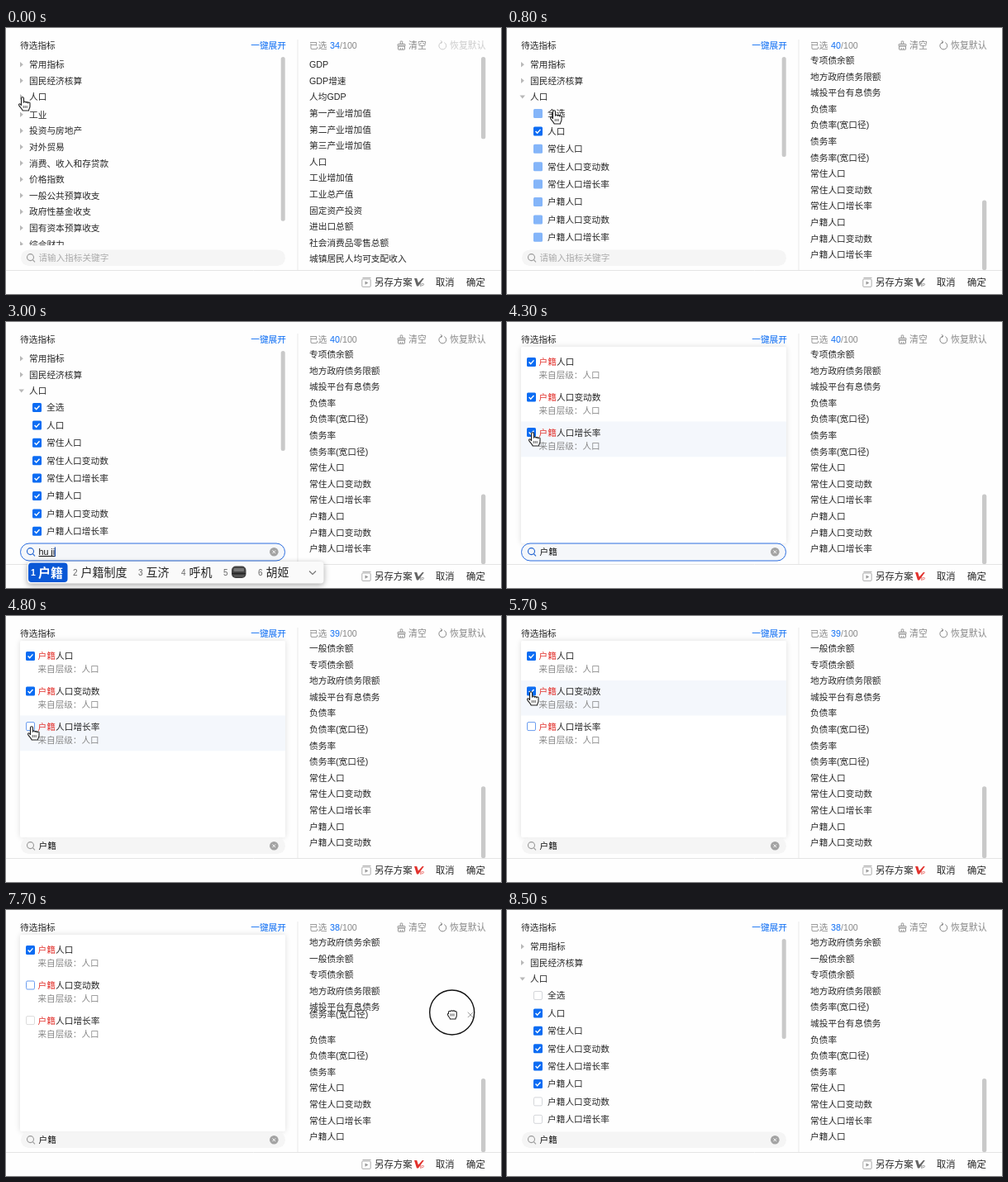
Animation of 599 by 322 pixels, one loop 8600 ms. Source, as an HTML page with a canvas:

```html
<!DOCTYPE html>
<html lang="zh-CN">
<head>
<meta charset="utf-8">
<title>指标选择</title>
<style>
html, body { margin: 0; width: 100%; height: 100%; overflow: hidden; background: #fff; }
canvas { display: block; width: 599px; height: 322px; }
</style>
</head>
<body>
<canvas id="stage"></canvas>
<script>
const W = 599, H = 322, LOOP = 8600, ROW = 19.6, SUB = 21.4;
const FONT = '"Liberation Sans", "Noto Sans CJK SC", "Noto Sans CJK", sans-serif';
const BLUE = '#0b6cf3', INK = '#262626', GREY = '#888', RED = '#e2322d';

// Moments at which the state changes, in ms
const T = { all: 720, focus: 1900, type: 2400, pick: 3300, results: 3500,
  off3: 4600, off2: 5900, grab: 6900, drop: 7900, close: 8200 };

const groups = ['常用指标', '国民经济核算', '人口', '工业', '投资与房地产', '对外贸易',
  '消费、收入和存贷款', '价格指数', '一般公共预算收支', '政府性基金收支', '国有资本预算收支', '综合财力', '地方债务'];
const children = ['全选', '人口', '常住人口', '常住人口变动数', '常住人口增长率',
  '户籍人口', '户籍人口变动数', '户籍人口增长率'];
const basics = ['GDP', 'GDP增速', '人均GDP', '第一产业增加值', '第二产业增加值', '第三产业增加值',
  '人口', '工业增加值', '工业总产值', '固定资产投资', '进出口总额', '社会消费品零售总额',
  '城镇居民人均可支配收入', '农村居民人均可支配收入', '存款余额', '贷款余额', '一般公共预算收入',
  '税收收入', '一般公共预算支出', '财政自给率', '政府性基金收入', '政府性基金支出',
  '国有资本预算收入', '国有资本预算支出', '综合财力', '地方政府债务余额', '一般债余额',
  '专项债余额', '地方政府债务限额', '城投平台有息债务', '负债率', '负债率(宽口径)', '债务率', '债务率(宽口径)'];
const DRAGGED = 33, DROP_AT = 29;

// Pointer path: time, x, y
const path = [[0, 20, 84], [200, 20, 84], [600, 57, 100], [950, 57, 100], [1600, 110, 278],
  [3750, 110, 278], [4200, 31, 134], [5000, 31, 134], [5500, 29, 92], [6050, 29, 92],
  [6700, 540, 195.5], [7000, 540, 195.5], [7700, 540, 126], [7900, 540, 117.5],
  [8000, 540, 117.5], [8300, 625, 100], [LOOP, 625, 100]];

const HAND = new Path2D('M-1.5 1.2a1.5 1.5 0 0 1 3 0V6.2a1.3 1.3 0 0 1 2.6.2a1.3 1.3 0 0 1 2.5.5' +
  'a1.2 1.2 0 0 1 2.4.6V11c0 2-1.5 3-1.5 5H.2C-.3 14-3 12-4.4 9.4C-5 8-3.4 7.2-2.5 8.4L-1.5 9.6Z');
const FIST = new Path2D('M-4.5-2a1.6 1.6 0 0 1 2.6-1.4a1.6 1.6 0 0 1 2.6-.3a1.6 1.6 0 0 1 2.6.5' +
  'a1.4 1.4 0 0 1 2 1.5V2c0 2-1.3 2.5-1.3 4H-2.5C-3 4-5.5 2.5-5.5.5C-5.5-.5-4.9-1-4.5-.6Z');

const canvas = document.getElementById('stage');
const dpr = window.devicePixelRatio || 1;
canvas.width = W * dpr;
canvas.height = H * dpr;
const c = canvas.getContext('2d');

const clamp = v => Math.max(0, Math.min(1, v));
const ramp = (t, a, b) => clamp((t - a) / (b - a));
const smooth = k => k * k * (3 - 2 * k);

function text(s, x, y, color = INK, size = 10.7, align = 'left', weight = 400) {
  c.font = `${weight} ${size}px ${FONT}`;
  c.textAlign = align;
  c.fillStyle = color;
  c.fillText(s, x, y + size * 0.37);
}

function box(x, y, w, h, r, fill, stroke, lw = 1) {
  c.beginPath();
  c.roundRect(x, y, w, h, r);
  if (fill) { c.fillStyle = fill; c.fill(); }
  if (stroke) { c.strokeStyle = stroke; c.lineWidth = lw; c.stroke(); }
}

function line(color, lw, ...pts) {
  c.beginPath();
  for (let i = 0; i < pts.length; i += 2) c.lineTo(pts[i], pts[i + 1]);
  c.strokeStyle = color;
  c.lineWidth = lw;
  c.stroke();
}

function poly(color, ...pts) {
  c.beginPath();
  for (let i = 0; i < pts.length; i += 2) c.lineTo(pts[i], pts[i + 1]);
  c.fillStyle = color;
  c.fill();
}

function ring(x, y, r, color, lw, from = 0, to = Math.PI * 2) {
  c.beginPath();
  c.arc(x, y, r, from, to);
  c.strokeStyle = color;
  c.lineWidth = lw;
  c.stroke();
}

function cross(x, y, r, color) {
  line(color, 1, x - r, y - r, x + r, y + r);
  line(color, 1, x + r, y - r, x - r, y + r);
}

function clipped(x, y, w, h, draw) {
  c.save();
  c.beginPath();
  c.rect(x, y, w, h);
  c.clip();
  draw();
  c.restore();
}

function pointer(t) {
  const i = path.findIndex((p, n) => n && t <= p[0]);
  const [t0, x0, y0] = path[i - 1], [t1, x1, y1] = path[i];
  const k = smooth(ramp(t, t0, t1));
  return { x: x0 + (x1 - x0) * k, y: y0 + (y1 - y0) * k };
}

// How far child i is ticked, 0 to 1
function ticked(i, t) {
  if (i === 1) return 1;
  const on = ramp(t, T.all, T.all + 160);
  const off = i === 6 ? T.off2 : i === 7 || i === 0 ? T.off3 : LOOP * 2;
  return on * (1 - ramp(t, off, off + 160));
}

function checkbox(x, y, k, edge = '#d4d6da') {
  if (k < 1) box(x + .5, y - 5, 10, 10, 1.5, '#fff', k ? null : edge);
  c.globalAlpha = k;
  if (k) box(x, y - 5.5, 11, 11, 1.5, BLUE);
  c.globalAlpha = 1;
  if (k > .6) line('#fff', 1.4, x + 2.6, y, x + 4.7, y + 2.2, x + 8.5, y - 2);
}

function drawTree(t) {
  const open = 1.8 + 169.2 * smooth(ramp(t, 0, 260));
  clipped(0, 33, 345, 230, () => {
    groups.forEach((name, i) => {
      const y = 44.2 + i * ROW + (i > 2 ? open : 0);
      if (i === 2 && t > 60) poly('#b8b8b8', 15.5, y - 2, 22, y - 2, 18.7, y + 2);
      else poly('#b8b8b8', 17, y - 3.3, 20.8, y, 17, y + 3.3);
      text(name, 28, y);
    });
    clipped(0, 93, 345, open, () => children.forEach((name, i) => {
      const y = 103.5 + i * SUB;
      checkbox(32, y, ticked(i, t));
      text(name, 49, y);
    }));
  });
  box(332.7, 35, 5, 229 * 229 / (262 + open), 2.5, '#c9c9c9');
}

function drawResults(t, p) {
  c.save();
  c.shadowColor = 'rgba(0,0,0,.13)';
  c.shadowBlur = 7;
  box(17, 30, 321, 238, 2, '#fff');
  c.restore();
  const last = t >= T.off2 ? 1 : t >= T.off3 ? 2 : -1;
  children.slice(5).forEach((name, i) => {
    const y = 48.4 + i * 42.6;
    if (p.x > 17 && p.x < 338 && p.y > y - 13 && p.y < y + 29.6) box(17, y - 13, 321, 42.6, 0, '#f4f7fc');
    checkbox(24, y, ticked(i + 5, t), i === last ? '#6b9df0' : '#dcdcdc');
    text('户籍', 38.5, y, RED);
    text(name.slice(2), 60, y);
    text('来自层级：人口', 38.5, y + 16, GREY, 10.6);
  });
}

function drawSearch(t) {
  const focused = t >= T.focus && t < T.off3;
  if (focused) box(17.5, 268, 320, 21, 10.5, '#f5f7fa', '#2a6de0');
  else box(18, 268.5, 320, 19.5, 9.7, '#f5f5f5');
  const icon = focused ? '#1f62d0' : '#999';
  ring(29.5, 277.6, 4, icon, 1.1);
  line(icon, 1.1, 32.4, 280.6, 35, 283.4);

  const typing = t >= T.type && t < T.pick;
  const typed = typing ? 'hu ji'.slice(0, 1 + Math.floor((t - T.type) / 120)) : t >= T.pick ? '户籍' : '';
  if (typed) {
    text(typed, 39.5, 278.2, '#111');
    const end = 39.5 + c.measureText(typed).width;
    if (typing) {
      line('#111', 1, 39.5, 283.5, end, 283.5);
      line('#1a4fae', 1.2, end + .3, 272.5, end + .3, 284);
    }
    c.beginPath();
    c.arc(324.3, 278.3, 5.3, 0, 7);
    c.fillStyle = '#a3a3a3';
    c.fill();
    cross(324.3, 278.3, 1.8, '#fff');
  } else {
    text('请输入指标关键字', 39.5, 278.2, '#aaa', 10.6);
    if (focused) line(BLUE, 1.2, 39.5, 272.5, 39.5, 284);
  }
}

function drawCandidates() {
  c.save();
  c.shadowColor = 'rgba(0,0,0,.35)';
  c.shadowBlur = 7;
  c.shadowOffsetY = 2;
  box(26, 290, 358.5, 26.5, 4, '#fafafa');
  c.restore();
  box(27, 291.5, 47.5, 23.5, 4, '#0a58d6');
  text('1', 30, 303.6, '#fff', 10.5, 'left', 700);
  text('户籍', 39, 303.2, '#fff', 15, 'left', 700);
  const words = ['户籍制度', '互济', '呼机', '', '胡姬'];
  [81, 160, 212, 263, 305].forEach((x, i) => {
    text(i + 2, x, 303.6, '#666', 10);
    text(words[i], x + 9.5, 303.2, INK, 14);
  });
  // Pager
  box(273, 295.5, 17.5, 14.5, 5, '#444');
  box(275.5, 298, 12.5, 4, 1, '#777');
  line('#222', 1.2, 273.5, 304.5, 290, 304.5);
  line('#777', .8, 276, 307.3, 288, 307.3);
  line('#777', 1.2, 367, 301.5, 371, 305.5, 375, 301.5);
}

function drawSelected(t, p) {
  const list = basics.concat(children.slice(2).filter((_, i) => {
    const n = i + 2;
    return t >= T.all && !(n === 7 && t >= T.off3) && !(n === 6 && t >= T.off2);
  }));
  const n = list.length;
  const scroll = t < T.all ? 0 : (n - 1) * ROW - 230.1;
  const rowY = i => 44.2 + i * ROW - scroll;
  const held = t >= T.grab;
  const heldY = t >= T.drop ? rowY(DROP_AT) : Math.min(rowY(DRAGGED), p.y + .4);

  clipped(355, 33, 230, 260, () => list.forEach((name, i) => {
    let y = rowY(i);
    if (held && i === DRAGGED) y = heldY;
    else if (held && i >= DROP_AT && i < DRAGGED) y += ROW * clamp((y + 8 - heldY) / 6);
    if (y > 24 && y < 303) text(name, 367, y);
  }));
  if (held && t < T.drop + 100) cross(562, heldY + .5, 3.2, '#999');

  const size = 258 * 258 / (n * ROW + 4);
  box(575, t < T.all ? 35 : 293 - size, 5.3, size, 2.6, '#c9c9c9');

  text('已选', 367, 21, GREY);
  text(n, 392, 21.2, BLUE);
  text('/100', 404, 21.2, GREY);
}

function drawFrame(t, vip) {
  text('待选指标', 17, 21);
  text('一键展开', 339, 21, BLUE, 10.7, 'right');

  // Broom
  box(477.2, 16, 2.6, 3.5, .5, null, GREY, .9);
  box(474, 19.5, 9, 2.3, .5, null, GREY, .9);
  box(474.5, 21.8, 8, 4.4, .5, null, GREY, .9);
  line(GREY, .9, 477.2, 26, 477.2, 24);
  line(GREY, .9, 479.9, 26, 479.9, 24);
  text('清空', 487, 21, GREY, 10.9);

  const reset = t < T.all ? '#ccc' : GREY;
  ring(528.3, 21.5, 4.4, reset, 1, -1.1, 4.5);
  line(reset, 1, 525.8, 15.2, 528, 17.1, 525.9, 19);
  text('恢复默认', 537, 21, reset, 10.9);

  line('#e9e9e9', 1, 353, 14, 353, 293);
  line('#e4e4e4', 1, 0, 293.5, W, 293.5);

  box(430.8, 304, 10.4, 9.3, 1, null, '#999', .8);
  line('#999', .8, 431.5, 302.4, 441.5, 302.4);
  poly('#999', 434.5, 306.4, 438.4, 308.6, 434.5, 310.8);
  text('另存方案', 446, 308, INK, 11.4);
  poly(vip, 494, 303, 497.2, 303, 498.9, 308.5, 503.8, 303, 505.8, 303, 499, 312.6, 497, 312.6);
  text('IP', 500.8, 310.8, vip, 5.5);
  text('取消', 520, 308, INK, 11.3);
  text('确定', 557, 308, INK, 11.4);
}

function drawPointer(t, p) {
  if (t > T.type && t < 3750) return;
  c.save();
  c.translate(p.x, p.y);
  c.lineJoin = 'round';
  if (p.y > 268 && p.x < 338) {
    line('#222', 1, 0, -6, 0, 6);
    line('#222', 1, -2, -6.5, 2, -6.5);
    line('#222', 1, -2, 6.5, 2, 6.5);
  } else {
    const grabbing = t >= T.grab && t < T.drop;
    const shape = grabbing ? FIST : HAND;
    if (grabbing) ring(-.3, -2, 27, '#111', 1.4);
    c.fillStyle = '#fff';
    c.fill(shape);
    c.strokeStyle = '#222';
    c.lineWidth = 1.1;
    c.stroke(shape);
    const top = grabbing ? -.5 : 10;
    for (let i = 0; i < 3; i++) {
      const x = (grabbing ? -2 : 1.2) + i * 2;
      line('#333', .8, x, top, x, top + 3);
    }
  }
  c.restore();
}

function render(t) {
  c.setTransform(dpr, 0, 0, dpr, 0, 0);
  c.fillStyle = '#fefefe';
  c.fillRect(0, 0, W, H);
  const p = pointer(t);
  const searching = t >= T.results && t < T.close;
  drawFrame(t, searching ? RED : '#666');
  if (searching) drawResults(t, p);
  else drawTree(t);
  drawSearch(t);
  drawSelected(t, p);
  if (t >= T.type && t < T.pick) drawCandidates();
  drawPointer(t, p);
}

const start = performance.now();
function tick() {
  render((performance.now() - start) % LOOP);
  requestAnimationFrame(tick);
}
tick();
</script>
</body>
</html>
```
